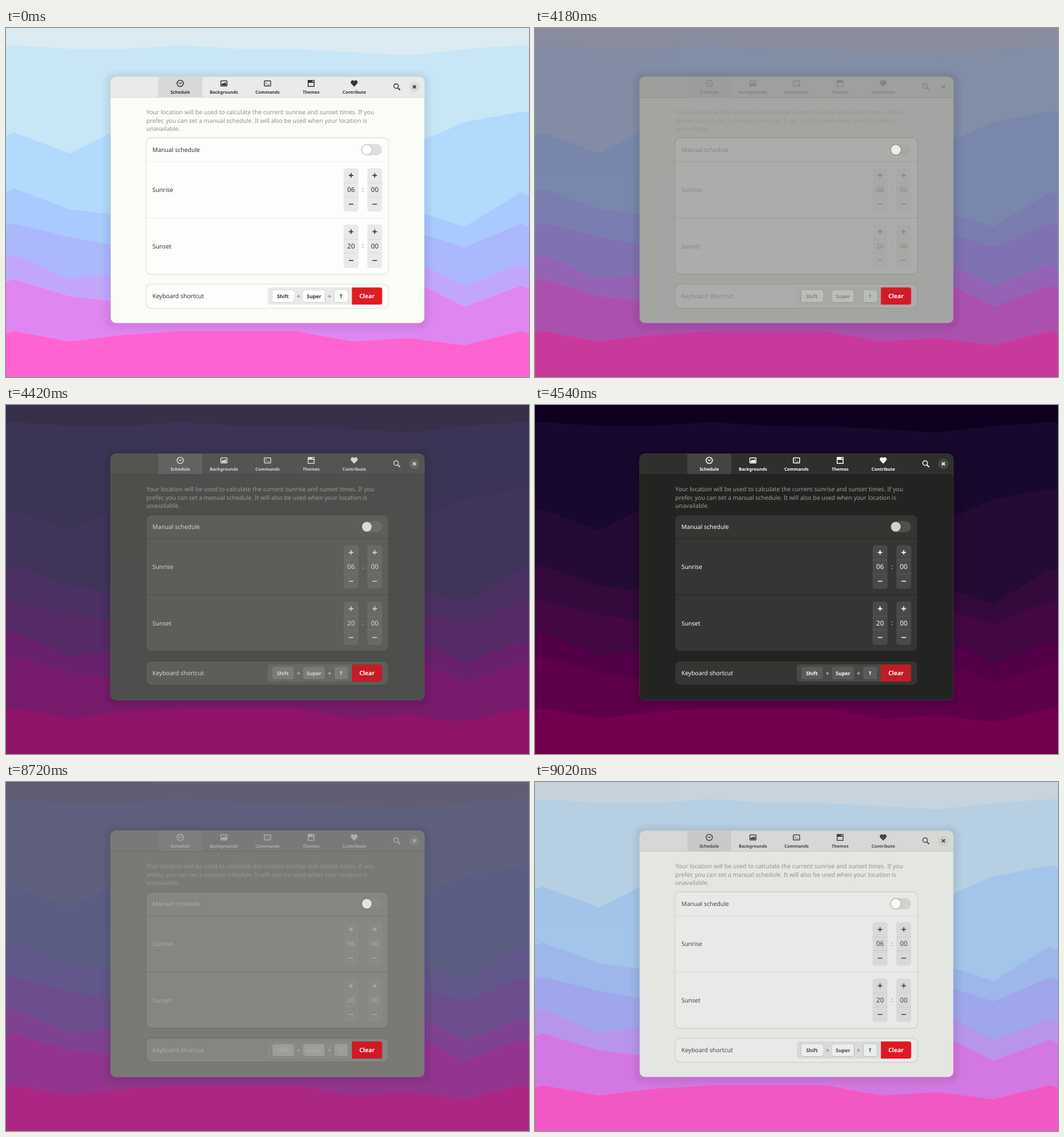
Animation of 917x611 px, one loop 9.08 s. Source, as an HTML page:

```html
<!DOCTYPE html>
<html lang="en">
<head>
<meta charset="utf-8">
<title>Light and dark schedule</title>
<style>
  html, body { margin: 0; width: 100%; height: 100%; overflow: hidden; }
  svg { display: block; width: 917px; height: 611px; font: 10.45px "Noto Sans", "Open Sans", sans-serif; text-rendering: geometricPrecision; }

  .light {
    --sky: #dcebf2; --h1: #c9e6f7; --h2: #b2dafd; --h3: #a9cafe; --h4: #abb8fe; --h5: #c2a6fd; --h6: #e086f3; --h7: #ff62d1;
    --window: #fafcf8; --header: #e9ebe8; --tab: #d7d9d6; --edge: #d9dbd8; --rim: #00000006; --shade: .065;
    --card: #fcfefb; --lift: #0000003d; --line: #ebedea; --text: #323431; --dim: #8f918e; --plus: #8f918e;
    --close: #dcdedb; --track: #dfe1de; --knob: #fcfefb; --spin: #e8eae7; --split: #d8dad7;
    --keys: #e8eae7; --key: #fcfefb; --keyedge: #00000066; --red: #e01b24;
  }
  .dark {
    --sky: #0f001f; --h1: #19082d; --h2: #240b33; --h3: #340a3c; --h4: #430842; --h5: #530049; --h6: #5f004b; --h7: #73004f;
    --window: #232421; --header: #2e302d; --tab: #434543; --edge: #1f211e; --rim: #ffffff1a; --shade: .12;
    --card: #343633; --lift: #00000020; --line: #222421; --text: #fff; --dim: #9c9e9a; --plus: #b5b7b3;
    --close: #454744; --track: #4f514e; --knob: #d0d2ce; --spin: #484a47; --split: #5a5c59;
    --keys: #484a47; --key: #5a5c59; --keyedge: #00000008; --red: #c01c28;
    opacity: 0;
    animation: night 9080ms infinite;
  }
  /* ten 60 ms steps into dark, nine back, the loop itself is the last */
  @keyframes night {
    0% { opacity: 0; animation-timing-function: step-end; }
    44.0528% { opacity: 0; animation-timing-function: steps(10, jump-start); }
    50.6607% { opacity: 1; animation-timing-function: step-end; }
    94.0528% { opacity: 1; animation-timing-function: steps(9, jump-start); }
    100% { opacity: .1; }
  }

  .card { fill: var(--card); filter: drop-shadow(0 .8px 1.1px var(--lift)) drop-shadow(0 0 .5px var(--lift)); }
  .key { fill: var(--key); filter: drop-shadow(0 .6px .7px var(--keyedge)) drop-shadow(0 0 .4px var(--keyedge)); }
  .ink { fill: var(--text); }
  .pen { fill: none; stroke: var(--text); stroke-width: 1.5; }
  .dim { fill: var(--dim); }
  .line { fill: none; stroke: var(--line); }
  .mid { text-anchor: middle; }
  .bold { font-weight: 700; }
  .tabs { font-size: 7.6px; }
  .keys { font-size: 8.8px; }
  .digits { font-size: 11.7px; }
  .shade { opacity: var(--shade); filter: blur(5px); }
  .knob { fill: var(--knob); filter: drop-shadow(0 .4px .9px #0007); }
</style>
</head>
<body>
<svg viewBox="0 0 917 611">
  <defs>
    <g id="spin">
      <rect x="-13" y="-37.8" width="26" height="76" rx="4.5" fill="var(--spin)"/>
      <path d="M-13-12h26M-13 12h26" stroke="var(--split)"/>
      <path class="pen" style="stroke-width:1.7" d="M-4-25.2h8M0-29.2v8M-4 25.2h8"/>
    </g>
    <g id="time">
      <use href="#spin" x="605"/>
      <use href="#spin" x="646.5"/>
      <text class="ink mid" x="626" y="3.6">:</text>
    </g>

    <g id="scene">
      <rect width="917" height="611" fill="var(--sky)"/>
      <path fill="var(--h1)" d="M0 31L14 30 112 36.5H210L309 30 407 36.5 508 37 607 42 706 48 804 37 903 30 917 31V611H0z"/>
      <path fill="var(--h2)" d="M0 188L14 183 112 219.5 210 171 706 207 804 165 903 146.5 917 149V611H0z"/>
      <path fill="var(--h3)" d="M0 287L14 281 112 317.5 210 329 706 317 804 348 903 287.5 917 294V611H0z"/>
      <path fill="var(--h4)" d="M0 346L14 342 112 366 210 384 706 353 804 384 903 342.5 917 348V611H0z"/>
      <path fill="var(--h5)" d="M0 402L14 397 112 439.5 210 428 706 400 804 452 903 414.5 917 420V611H0z"/>
      <path fill="var(--h6)" d="M0 445L14 440 112 470 210 481 706 439 804 488 903 451.5 917 457V611H0z"/>
      <path fill="var(--h7)" d="M0 535L14 531 112 549 210 537 309 531H508L607 549 706 543 804 555.5 903 531 917 535V611H0z"/>

      <rect class="shade" x="174" y="78" width="569" height="449" rx="16"/>
      <rect x="183.5" y="85.5" width="550" height="431" rx="9" fill="var(--window)"/>
      <path fill="var(--header)" d="M183.5 121V94.5a9 9 0 0 1 9-9H724.5a9 9 0 0 1 9 9V121z"/>
      <path fill="var(--tab)" d="M267 85.5h77V121h-77z"/>
      <path stroke="var(--edge)" d="M183.5 121.5h550"/>
      <rect x="183.5" y="85.5" width="550" height="431" rx="9" fill="none" stroke="var(--rim)"/>

      <g class="pen">
        <circle cx="305.5" cy="97" r="5.5"/>
        <path d="M303 95.500l2.500 2.300 2.700-2.300" stroke-width="1.2"/>
        <rect x="376.7" y="92.5" width="10.8" height="9" rx=".8"/>
        <rect x="453" y="92.5" width="11" height="9" rx=".8"/>
        <path d="M455.300 95l1.800 1.700-1.800 1.700M458.300 99h3" stroke-width="1"/>
        <circle cx="684" cy="101.7" r="4"/>
        <path d="M687 104.700l4 4" stroke-width="2"/>
      </g>
      <g class="ink">
        <path d="M378 100.500v-2l2.500-2.500 1.500 1.300 2.300-2.300 2 2.300v3.200z"/>
        <path fill-rule="evenodd" d="M529 91h12v12h-12zM530.500 96v5.500h9V96zM537.300 92.300v2h2.400v-2z"/>
        <path d="M610.500 102.800L605.200 97.300C602.800 94 607.200 88.800 610.500 93 613.800 88.800 618.200 94 615.800 97.300z"/>
      </g>
      <circle cx="716" cy="103" r="9.2" fill="var(--close)"/>
      <path class="pen" style="stroke-width:1.9" d="M713.300 100.300l5.400 5.400m0-5.400l-5.400 5.400"/>

      <g class="ink mid bold tabs">
        <text x="305.5" y="114.5">Schedule</text>
        <text x="382" y="114.5">Backgrounds</text>
        <text x="458.5" y="114.5">Commands</text>
        <text x="535" y="114.5">Themes</text>
        <text x="610.7" y="114.5">Contribute</text>
      </g>

      <g class="dim">
        <text x="246" y="151.2">Your location will be used to calculate the current sunrise and sunset times. If you</text>
        <text x="246" y="165.7">prefer, you can set a manual schedule. It will also be used when your location is</text>
        <text x="246" y="180.2">unavailable.</text>
      </g>

      <rect class="card" x="246" y="192.7" width="424" height="238" rx="8"/>
      <path class="line" d="M246 234h424M246 332.500h424"/>
      <rect class="card" x="246" y="449" width="424" height="41" rx="8"/>
      <g class="ink">
        <text x="256.7" y="217">Manual schedule</text>
        <text x="256.7" y="287">Sunrise</text>
        <text x="256.7" y="385.5">Sunset</text>
        <text x="256.7" y="473.3">Keyboard shortcut</text>
      </g>

      <rect x="622.8" y="203.3" width="36.7" height="19.6" rx="9.8" fill="var(--track)"/>
      <circle class="knob" cx="632.7" cy="213.1" r="8.6"/>

      <use href="#time" y="283.3"/>
      <use href="#time" y="381.8"/>
      <g class="ink mid digits">
        <text x="605" y="287.3">06</text>
        <text x="646.5" y="287.3">00</text>
        <text x="605" y="385.8">20</text>
        <text x="646.5" y="385.8">00</text>
      </g>

      <path fill="var(--keys)" d="M607 454.300V484.300H463.500a4.500 4.500 0 0 1-4.500-4.500V458.800a4.500 4.500 0 0 1 4.500-4.500z"/>
      <path fill="var(--red)" d="M606.500 454.200h49.500a3.500 3.500 0 0 1 3.500 3.500v23a3.500 3.500 0 0 1-3.500 3.500h-49.500z"/>
      <rect class="key" x="466.8" y="458.3" width="38.2" height="22" rx="4"/>
      <rect class="key" x="521" y="458.3" width="38.3" height="22" rx="4"/>
      <rect class="key" x="575.5" y="458.3" width="24.3" height="22" rx="4"/>
      <path stroke="var(--plus)" stroke-width="1.3" d="M510.300 469.700h5.400M513 467v5.400M564.600 469.700h5.400M567.300 467v5.400"/>
      <g class="ink mid bold keys">
        <text x="485.5" y="472.7">Shift</text>
        <text x="540" y="472.7">Super</text>
        <text x="587.5" y="472.7">T</text>
      </g>
      <text class="mid bold" x="633" y="473.3" fill="#fff">Clear</text>
    </g>
  </defs>

  <use class="light" href="#scene"/>
  <use class="dark" href="#scene"/>
</svg>
</body>
</html>
```
